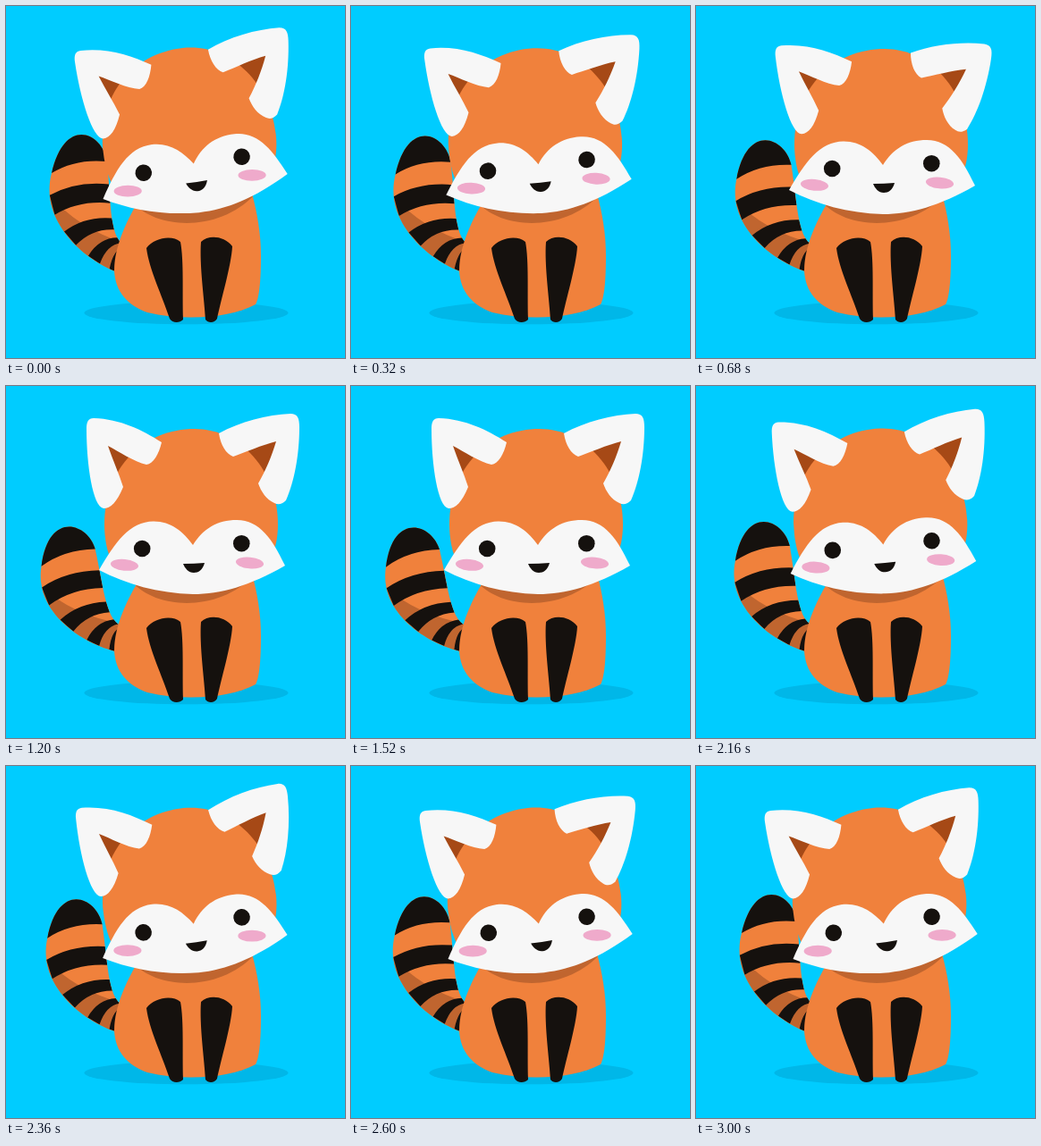
Recreate the animation shown at these times as an HTML page with a canvas. Size 379 by 394 pixels, loop 3040 ms.

```html
<!DOCTYPE html>
<html lang="en">
<head>
<meta charset="utf-8">
<title>Red panda</title>
<style>
html, body { margin: 0; width: 100%; height: 100%; overflow: hidden; background: #00ccff; }
canvas { display: block; width: 379px; height: 394px; }
</style>
</head>
<body>
<canvas id="stage"></canvas>
<script>
const W = 379, H = 394, LOOP = 3040;
const canvas = document.getElementById('stage');
const ctx = canvas.getContext('2d');
const ratio = window.devicePixelRatio || 1;
canvas.width = Math.round(W * ratio);
canvas.height = Math.round(H * ratio);

const SKY = '#00ccff', GROUND = '#00b7e8', FUR = '#f0813c', SHADE = '#c0652f';
const INK = '#15110e', WHITE = '#f7f7f7', BLUSH = '#efaacb', INNER = '#a64916';
const TILT = -6.3;

// Eased 0..1 ramp between two times
function ramp(t, from, to) {
  const u = Math.min(1, Math.max(0, (t - from) / (to - from)));
  return 0.5 - 0.5 * Math.cos(Math.PI * u);
}

// Rises from a to b, then falls from b to c
const pulse = (t, a, b, c) => ramp(t, a, b) - ramp(t, b, c);

// All moving values at one time
function pose(t) {
  const upright = ramp(t, 80, 600) - ramp(t, 1935, 2455);
  const droop = pulse(t, 80, 620, 1080), flick = pulse(t, 2330, 2590, 2840);
  const perked = 1 - ramp(t, 620, 1080) + ramp(t, 2590, 2840);
  return {
    swing: 1.17 * pulse(t, 40, 1425, 3020),
    tilt: TILT * (1 - upright),
    leftEar: -2 * perked - 5 * droop - 2 * flick,
    rightEar: 4.6 * perked + 4.2 * droop + 11.6 * flick,
    eye: 1 - 0.9 * pulse(t, 2845, 2920, 2995)
  };
}

const path = d => new Path2D(d);

const body = path('M150 215C136 238 121 268 121 296C122 320 136 335 158 343C200 353 252 349 279 334C284 325 285 300 285 280C285 255 281 232 275 210Z');
const neck = path('M142 220C168 250 238 254 278 211V190H142Z');
const legs = path('M157 271C166 259 186 256 195 264C199 285 197 320 198 351C194 355 186 355 183 350C175 325 160 295 157 271Z' +
  'M218 264C226 256 244 257 253 269C252 290 240 330 236 350C233 355 226 355 223 351C222 330 216 290 218 264Z');
const skull = path('M110 155C110 90 155 48 211 48C262 48 304 95 304 155C304 170 301 182 297 192L120 200C113 188 110 170 110 155Z');
const muzzle = path('M104 206C122 175 138 152 165 151.5C185 151.5 198 163 209 178C220 160 236 150 258 150C284 150 298 172 312 201C272 224 240 233 209 233C170 232 135 222 104 206Z');
const mouth = path('M198 199Q210 199 222 198C220 206 215 209 210 209C204 209 200 204 198 199Z');

const ears = [
  {
    name: 'leftEar', x: 168, y: 62,
    inner: path('M111 65L160 86L131 115Z'),
    outer: path('M98 36C128 37 152 49 174 63C171 76 165 87 157 88C143 85 126 73 114 67C119 82 126 97 131 113C124 130 117 137 109 137C97 135 90 88 90 48C90 40 92 36 98 36Z')
  },
  {
    name: 'rightEar', x: 242, y: 66,
    inner: path('M306 59L250 78L282 113Z'),
    outer: path('M238 53C262 40 292 32 318 31C326 31 328 36 328 46C328 78 322 108 313 128C308 133 304 133 300 131C291 127 285 118 282 109C290 95 297 79 302 62C286 66 268 74 254 79C246 76 240 66 238 53Z')
  }
];

// Tail: two side curves running from the tip cap down to the base
const outerSide = [[51, 187], [38, 235], [79, 279], [122, 297]];
const innerSide = [[113, 174], [118, 225], [115, 262], [136, 270]];
const tail = path(`M${outerSide[0]}C${outerSide.slice(1)}L${innerSide[3]}` +
  `C${[innerSide[2], innerSide[1], innerSide[0]]}C108 142 66 122 ${outerSide[0]}Z`);
const tailShade = path('M48 210Q78 248 134 266V310H30Z');

function along([a, b, c, d], u) {
  const v = 1 - u;
  return [0, 1].map(i => v * v * v * a[i] + 3 * u * v * v * b[i] + 3 * u * u * v * c[i] + u * u * u * d[i]);
}

// Edge k of 8 crosses the tail; spacing narrows towards the base
function bandEdge(k) {
  const u = 1 - Math.pow(1 - k / 8, 1.45);
  const a = along(outerSide, u), b = along(innerSide, u);
  const mid = [(a[0] + b[0]) / 2 - 4, (a[1] + b[1]) / 2 - 10];
  return { a, mid, b };
}

const bands = [path(`M${bandEdge(0).a}Q${bandEdge(0).mid},${bandEdge(0).b}L140 170V100H30V187Z`)];
for (let k = 1; k < 8; k += 2) {
  const top = bandEdge(k), low = bandEdge(k + 1);
  bands.push(path(`M${top.a}Q${top.mid},${top.b}L${low.b}Q${low.mid},${low.a}Z`));
}

function fill(color, shape) {
  ctx.fillStyle = color;
  ctx.fill(shape);
}

function ellipse(color, x, y, rx, ry, angle = 0) {
  const shape = new Path2D();
  shape.ellipse(x, y, rx, ry, angle, 0, Math.PI * 2);
  fill(color, shape);
}

function turn(x, y, degrees, squash = 1) {
  ctx.translate(x, y);
  ctx.rotate(degrees * Math.PI / 180);
  ctx.scale(1, squash);
  ctx.translate(-x, -y);
}

function drawTail(swing) {
  ctx.save();
  turn(122, 297, -6 * swing, 1 - 0.05 * swing);
  fill(FUR, tail);
  ctx.clip(tail);
  fill(SHADE, tailShade);
  bands.forEach(band => fill(INK, band));
  ctx.restore();
}

function drawBody() {
  fill(FUR, body);
  ctx.save();
  ctx.clip(body);
  fill(SHADE, neck);
  ctx.restore();
  fill(INK, legs);
}

function drawEars(part, color, p) {
  for (const ear of ears) {
    ctx.save();
    turn(ear.x, ear.y, p[ear.name]);
    fill(color, ear[part]);
    ctx.restore();
  }
}

function drawHead(p) {
  ctx.save();
  turn(196, 170, p.tilt);
  drawEars('inner', INNER, p);
  fill(FUR, skull);
  fill(WHITE, muzzle);
  drawEars('outer', WHITE, p);
  ellipse(BLUSH, 132.5, 200.3, 15.6, 6.4, 0.1);
  ellipse(BLUSH, 272.5, 198, 15.6, 6.4, 0.1);
  ellipse(INK, 152.2, 182, 9.3, 9.3 * p.eye);
  ellipse(INK, 263.3, 176.2, 9.3, 9.3 * p.eye);
  fill(INK, mouth);
  ctx.restore();
}

function draw(t) {
  const p = pose(t);
  ctx.setTransform(ratio, 0, 0, ratio, 0, 0);
  ctx.fillStyle = SKY;
  ctx.fillRect(0, 0, W, H);
  ellipse(GROUND, 201.5, 343.5, 114, 12.8);
  drawTail(p.swing);
  drawBody();
  drawHead(p);
}

const start = performance.now();
function tick() {
  draw((performance.now() - start) % LOOP);
  requestAnimationFrame(tick);
}
tick();
</script>
</body>
</html>
```
